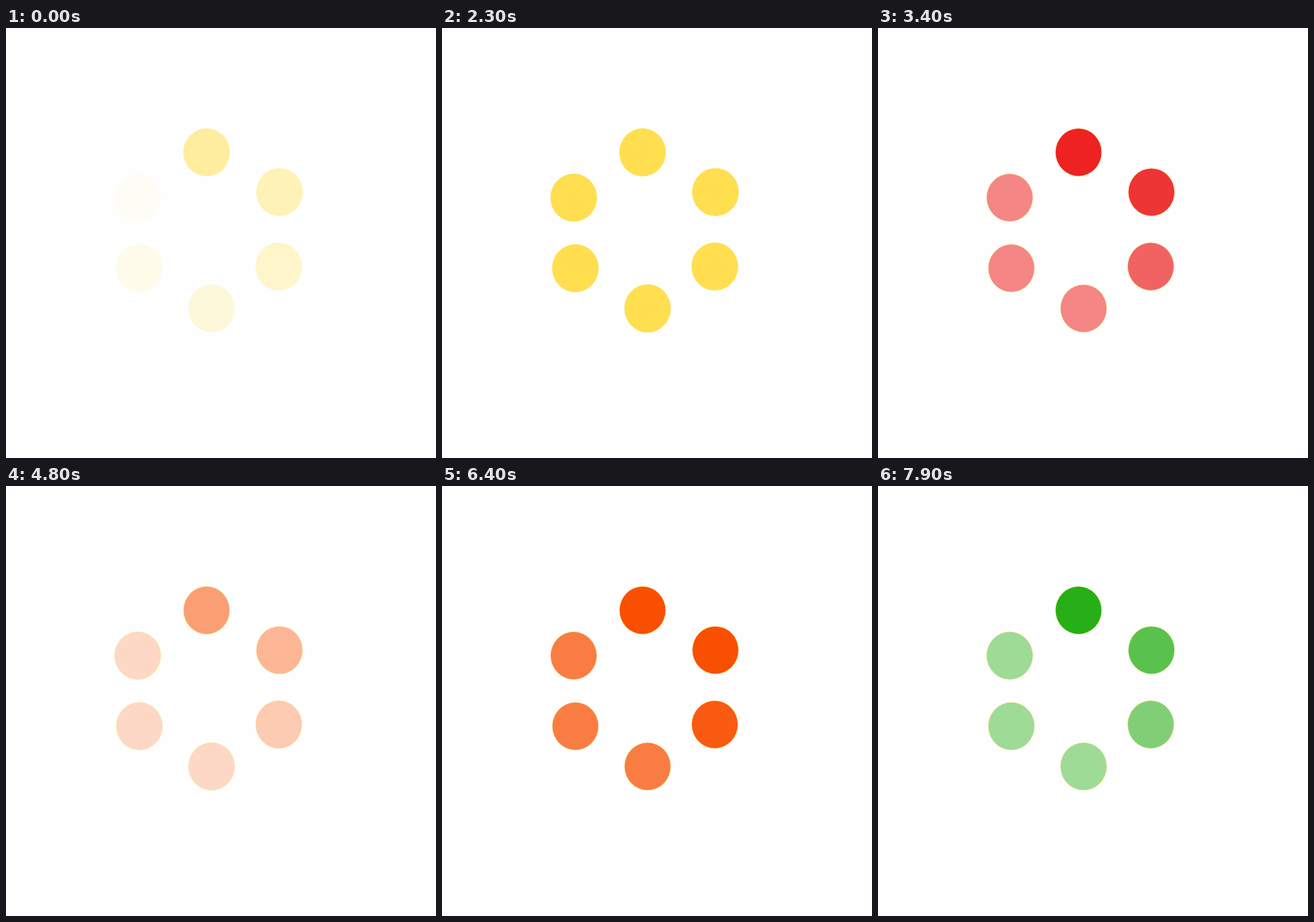
These frames come from a looping animation (640 px wide and 640 px high, 8000 ms). An HTML page:

```html
<!DOCTYPE html>
<html lang="en">
<head>
<meta charset="utf-8">
<title>Loading dots</title>
<style>
  html, body { margin: 0; width: 100%; height: 100%; overflow: hidden; background: #fefefe; }
  svg { display: block; width: 100%; height: 100%; }
  .rim { fill: none; stroke: #ffdf51; stroke-width: 1; }
</style>
</head>
<body>
<svg id="stage" viewBox="0 0 640 640"></svg>
<script>
  const LOOP = 8000, CYCLE = 2400, TICK = 100;
  const colors = ['#ffdf50', '#ed2221', '#f85000', '#26af16'];

  // Centre, then opacity at the start of a cycle and the time it takes to fill.
  // The first cycle staggers the last three dots; later ones fill them together.
  const dots = [
    { x: 298.5, y: 185,   from: 0.54,  fill: 600 },
    { x: 407,   y: 244.3, from: 0.415, fill: 1180 },
    { x: 406,   y: 355,   from: 0.303, fill: 1770 },
    { x: 306,   y: 417.4, from: 0.215, fill: 2400, first: 0.2 },
    { x: 198.5, y: 357.5, from: 0.215, fill: 2400, first: 0.11 },
    { x: 196,   y: 252.5, from: 0.215, fill: 2400, first: 0.05 }
  ];
  const FIRST_FILL = 2300;

  const stage = document.getElementById('stage');

  function ellipse(dot, cls) {
    const el = document.createElementNS('http://www.w3.org/2000/svg', 'ellipse');
    el.setAttribute('cx', dot.x);
    el.setAttribute('cy', dot.y);
    el.setAttribute('class', cls);
    return stage.appendChild(el);
  }

  function setSize(el, inset) {
    el.setAttribute('rx', 34.7 - inset);
    el.setAttribute('ry', 35.8 - inset);
  }

  for (const dot of dots) {
    dot.disc = ellipse(dot, 'disc');
    dot.rim = ellipse(dot, 'rim');
    setSize(dot.rim, 0.3);
  }

  function draw(ms) {
    const t = Math.floor((ms % LOOP) / TICK) * TICK;
    const cycle = Math.floor(t / CYCLE);
    const p = t % CYCLE;
    const first = cycle === 0;
    for (const dot of dots) {
      const staggered = first && dot.first !== undefined;
      const from = staggered ? dot.first : dot.from;
      const fill = staggered ? FIRST_FILL : dot.fill;
      const k = Math.min(1, p / fill);
      dot.disc.setAttribute('fill', colors[cycle]);
      dot.disc.setAttribute('fill-opacity', from + (1 - from) * k);
      setSize(dot.disc, first ? 0 : 0.4);
      dot.rim.setAttribute('stroke-opacity', first ? 0 : 0.4);
    }
  }

  const start = performance.now();
  function loop() {
    draw(performance.now() - start);
    requestAnimationFrame(loop);
  }
  draw(0);
  requestAnimationFrame(loop);
</script>
</body>
</html>
```
